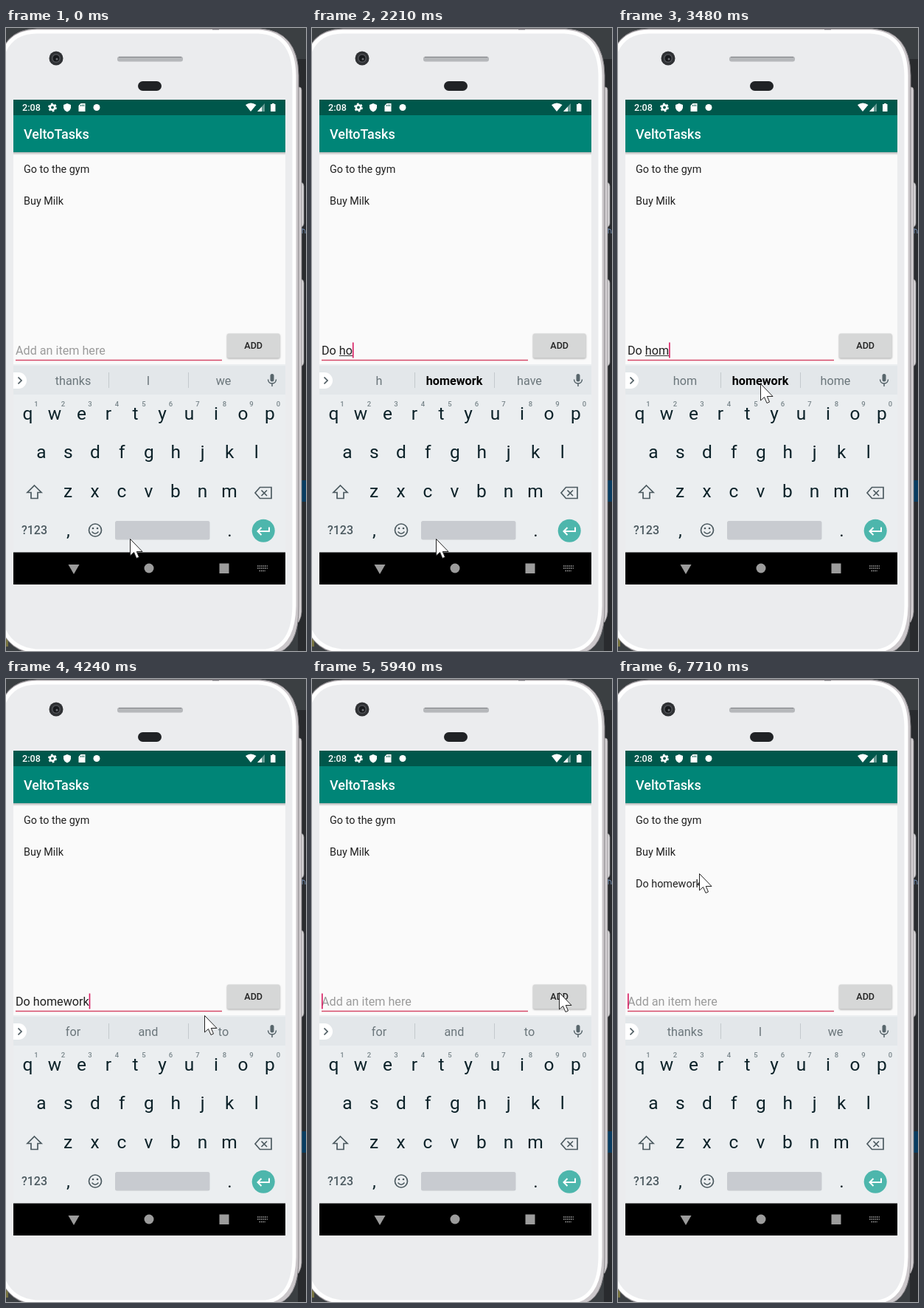
Animation of 407x843 px, one loop 8000 ms. Source, as an HTML page:

```html
<!DOCTYPE html>
<html lang="en">
<head>
<meta charset="utf-8">
<title>Adding a to-do item</title>
<style>
  html, body { margin: 0; width: 100%; height: 100%; overflow: hidden; background: #3b3f42; }
  svg { display: block; width: 407px; height: 843px; font-family: Roboto, sans-serif; }
  text { white-space: pre; }
  .mid { text-anchor: middle; }
  .key { font-size: 24.5px; fill: #0c2229; }
  .hint { font-size: 9.5px; fill: #78858a; font-weight: 500; }
  .word { font-size: 16.2px; fill: #6b767b; }
  .bold { font-weight: 700; fill: #000; }
  .item { font-size: 14.4px; fill: #212121; }
  .line { fill: none; stroke: #4c5a60; stroke-width: 1.7; }
  .thin { stroke-width: 1.4; }
  #button { filter: drop-shadow(0 1px 1px #0005); }
</style>
</head>
<body>
<svg viewBox="0 0 407 843">
  <defs>
    <clipPath id="screen"><rect x="10" y="97" width="369" height="656"/></clipPath>
    <linearGradient id="shade" x2="0" y2="1">
      <stop stop-color="#000" stop-opacity=".28"/><stop offset="1" stop-color="#000" stop-opacity="0"/>
    </linearGradient>
  </defs>

  <!-- desktop behind the phone -->
  <rect width="407" height="843" fill="#3b3f42"/>
  <path d="M396 42H407V843H396Z" fill="#292b2e"/>
  <path d="M401 612H407V641H401Z" fill="#083c61"/>
  <path d="M402 271V278M402 273Q406 270 406 278" fill="none" stroke="#7592b8"/>
  <path d="M0 824H3V837H0Z" fill="#77733f"/>

  <!-- phone body -->
  <path d="M399 209H401Q404 210 404 214V264Q404 269 399 270ZM399 340H401Q404 341 404 345V452Q404 457 399 458Z" fill="#dedcde" stroke="#8f8d90" stroke-width=".8"/>
  <path d="M392 80H398Q401 80 401 84V790Q401 796 397 804H385Z" fill="#d3cfd2" stroke="#8b888c" stroke-width=".8"/>
  <path d="M-12 60Q-8 1 42 1H345Q396 4 397 64V782Q398 842 362 847H40Q-10 842-12 782Z" fill="#cbc7ca" stroke="#858286"/>
  <path d="M280 0H289V5H280Z" fill="#77747a"/>
  <path d="M-9 62Q-6 5 42 5H342Q390 7 391 64V782Q390 838 352 843H40Q-8 838-9 782Z" fill="#ebecee" stroke="#fff" stroke-width="5"/>
  <circle cx="68" cy="41" r="9.5" fill="#2f3134"/>
  <circle cx="68" cy="41" r="6" fill="#505257"/>
  <circle cx="68" cy="41" r="4.500" fill="#17191c"/>
  <circle cx="69" cy="42" r="1.500" fill="#6d6f74"/>
  <rect x="151" y="38.500" width="89" height="7" rx="3" fill="#b6b8bb"/>
  <path d="M153 39.500H238" stroke="#85878b"/>
  <rect x="179" y="72" width="32" height="13" rx="6.5" fill="#202225"/>

  <g clip-path="url(#screen)">
    <rect x="10" y="97" width="369" height="656" fill="#fafafa"/>
    <rect x="10" y="168" width="369" height="4" fill="url(#shade)"/>
    <rect x="10" y="118" width="369" height="50" fill="#008577"/>
    <rect x="10" y="97" width="369" height="21" fill="#00574b"/>

    <!-- status bar -->
    <g fill="#fff">
      <text x="22" y="112" font-size="12.6" font-weight="500">2:08</text>
      <circle cx="63" cy="107.500" r="3.200" fill="none" stroke="#fff" stroke-width="2.600"/>
      <circle cx="63" cy="107.500" r="5" fill="none" stroke="#fff" stroke-width="1.800" stroke-dasharray="2.618"/>
      <path d="M83 102L88 104V108Q87 112 83 113.500Q79 112 78 108V104Z"/>
      <path d="M101.500 102H107.500V113H98.500V105Z"/>
      <path d="M101.500 104V106M103.500 103.500V106M105.500 103.500V106" stroke="#00574b" stroke-width=".9"/>
      <circle cx="123" cy="107.500" r="4.500"/>
      <path d="M325 104Q332 99 339.500 104L332 113Z"/>
      <path d="M351 102V113H341Z" opacity=".4"/>
      <path d="M347 106.500V113H341Z"/>
      <path d="M359 103H361V102H364V103H365.500V113H359Z"/>
    </g>
    <text x="24" y="150" font-size="18" font-weight="500" fill="#fff">VeltoTasks</text>

    <text class="item" x="24" y="195.500">Go to the gym</text>
    <text class="item" x="24" y="238.500">Buy Milk</text>
    <text class="item" x="24" y="281.500" id="added">Do homework</text>

    <!-- entry row -->
    <text id="entry" x="13" y="442" font-size="16.16"></text>
    <rect id="compose" y="443" height="1" fill="#333"/>
    <path d="M13 449.500H293" stroke="#d54a68" stroke-width="1.400"/>
    <rect id="caret" y="425.500" width="1.600" height="21" fill="#d81b60"/>
    <rect id="button" x="300" y="413.500" width="71.500" height="33" rx="2"/>
    <text class="mid" x="335.700" y="434.300" font-size="12.57" font-weight="500" fill="#222">ADD</text>

    <!-- keyboard -->
    <rect x="10" y="455" width="369" height="255" fill="#ebeef0"/>
    <rect x="10" y="457" width="369" height="39" fill="#e3e7ea"/>
    <rect x="-2" y="466" width="30" height="22" rx="11" fill="#fff"/>
    <path class="line" d="M16.500 472.500L21 477L16.500 481.500"/>
    <path d="M139.500 466V487M247.500 466V487" stroke="#c3c9cd"/>
    <g id="words"></g>
    <rect x="358.500" y="468" width="5" height="10.500" rx="2.500" fill="#58666c"/>
    <path class="line thin" d="M355.500 475.500Q356 481 361 481T366.500 475.500M361 481V485"/>
    <g id="keys"></g>

    <path class="line" d="M38.500 619L48 628.500H43V636.500H34V628.500H29Z"/>
    <path class="line" d="M344.500 621.500H360V636.500H344.500L338 629ZM346.500 625.500L354 633M354 625.500L346.500 633"/>
    <text class="mid" x="38.500" y="685" font-size="16" font-weight="500" fill="#4c5a60">?123</text>
    <text class="key mid" x="84.500" y="688">,</text>
    <text class="key mid" x="303.500" y="688">.</text>
    <circle class="line" cx="121" cy="679.500" r="8.500"/>
    <path class="line thin" d="M116.500 681.500Q121 687 125.500 681.500"/>
    <g fill="#4c5a60"><circle cx="118" cy="677" r="1.300"/><circle cx="124" cy="677" r="1.300"/></g>
    <rect x="148" y="667" width="128.500" height="25.500" rx="2.500" fill="#c8cbd0"/>
    <circle cx="349.200" cy="680.200" r="15.500" fill="#4db6ac"/>
    <path d="M357 675.500V681H342M346.500 676L341.500 681L346.500 686" fill="none" stroke="#fff" stroke-width="2"/>

    <g id="toast">
      <rect x="127" y="646" width="134" height="42" rx="21" fill="#ebedee"/>
      <text x="149.500" y="671" font-size="12.57" fill="#2b2b2b">Item was added</text>
    </g>

    <!-- navigation bar -->
    <rect x="10" y="709.500" width="369" height="44"/>
    <g fill="#9c9c9c">
      <path d="M84.500 726H99.500L92 739Z"/>
      <circle cx="194" cy="731" r="6.500"/>
      <rect x="289.500" y="724.500" width="13" height="13.500"/>
      <path d="M341 728H355M341 731H355M343.500 734.500H352" fill="none" stroke="#9c9c9c" stroke-width="1.500" stroke-dasharray="1.600 1"/>
    </g>
  </g>

  <path id="mouse" d="M.5 .5V23L5.500 18.500L9 26.500L12.500 25L9.300 17.500H17Z" fill="#fff" stroke="#222"/>
</svg>

<script>
const $ = id => document.getElementById(id);
const LOOP = 8000, LEFT = 13;
const pen = document.createElement('canvas').getContext('2d');
pen.font = '16.16px Roboto, sans-serif';
const width = s => pen.measureText(s).width;

const label = (cls, x, y, s) => `<text class="${cls}" x="${x}" y="${y}">${s}</text>`;

[['qwertyuiop', 29.5], ['asdfghjkl', 47.8], ['zxcvbnm', 84]].forEach(([row, x0], r) => {
  $('keys').innerHTML += [...row].map((c, i) => {
    const x = x0 + i * 36.5;
    return label('key mid', x, 529.7 + r * 52.5, c) + (r ? '' : label('hint mid', x + 11.5, 512, (i + 1) % 10));
  }).join('');
});

// Each step changes only the listed parts; "_" marks the word being composed.
const steps = [
  [0, { text: '', caret: 0, words: 'thanks I we', mouse: [168, 691], button: '#d6d7d7', toast: 0, added: 0 }],
  [150, { caret: 1 }],
  [650, { text: '_D' }],
  [770, { words: 'D *Do Dr' }],
  [910, { text: '_Do', words: "Do *Don't Dog" }],
  [1160, { text: 'Do ' }],
  [1280, { words: 'you not something' }],
  [1660, { caret: 0 }],
  [1930, { text: 'Do _h', caret: 1, words: 'h *homework have' }],
  [2210, { text: 'Do _ho' }],
  [2330, { words: 'ho *homework home' }],
  [2450, { text: 'Do _hom', words: 'hom *homework home' }],
  [2820, { mouse: [168, 688] }],
  [2970, { mouse: [168, 660], caret: 0 }],
  [3120, { mouse: [174, 600] }],
  [3240, { mouse: [190, 535] }],
  [3360, { mouse: [203, 492] }],
  [3480, { mouse: [193, 481], caret: 1 }],
  [3970, { text: 'Do homework' }],
  [4120, { mouse: [226, 471], words: 'for and to' }],
  [4240, { mouse: [269, 455] }],
  [4390, { mouse: [317, 434] }],
  [4540, { mouse: [335, 424], caret: 0 }],
  [5060, { caret: 1 }],
  [5180, { button: '#cdcece' }],
  [5300, { button: '#c6c7c7' }],
  [5550, { text: '' }],
  [5690, { button: '#d3d4d4' }],
  [5940, { button: '#d6d7d7' }],
  [6060, { added: 1, caret: 0 }],
  [6180, { words: 'thanks I we', toast: .3, mouse: [331, 414] }],
  [6300, { toast: .6, mouse: [311, 375] }],
  [6450, { toast: .85, mouse: [299, 326] }],
  [6580, { toast: 1, mouse: [285, 295], caret: 1 }],
  [6730, { mouse: [255, 284] }],
  [7130, { mouse: [252, 286], caret: 0 }],
  [7250, { mouse: [242, 284] }],
  [7400, { mouse: [154, 277], toast: .6 }],
  [7560, { mouse: [118, 247], toast: .25, caret: 1 }],
  [7710, { mouse: [110, 263], toast: 0 }]
];

let state = {};
const scenes = steps.map(([at, change]) => ({ ...(state = { ...state, ...change }), at }));

function draw(s) {
  const text = s.text.replace('_', '');
  const [before, composing = ''] = s.text.split('_');
  $('entry').textContent = text || 'Add an item here';
  $('entry').setAttribute('fill', text ? '#212121' : '#9b9b9b');
  $('compose').setAttribute('x', LEFT + width(before));
  $('compose').setAttribute('width', composing ? width(composing) : 0);
  $('caret').setAttribute('x', LEFT + width(text));
  $('caret').setAttribute('opacity', s.caret);
  $('button').setAttribute('fill', s.button);
  $('added').setAttribute('opacity', s.added);
  $('toast').setAttribute('opacity', s.toast);
  $('mouse').setAttribute('transform', `translate(${s.mouse})`);
  $('words').innerHTML = s.words.split(' ').map((w, i) =>
    label('word mid' + (w[0] === '*' ? ' bold' : ''), 91 + i * 102, 482.5, w.replace('*', ''))).join('');
}

let shown;
function tick() {
  const t = performance.now() % LOOP;
  const scene = scenes.findLast(s => s.at <= t);
  if (scene !== shown) draw(shown = scene);
  requestAnimationFrame(tick);
}
tick();
</script>
</body>
</html>
```
